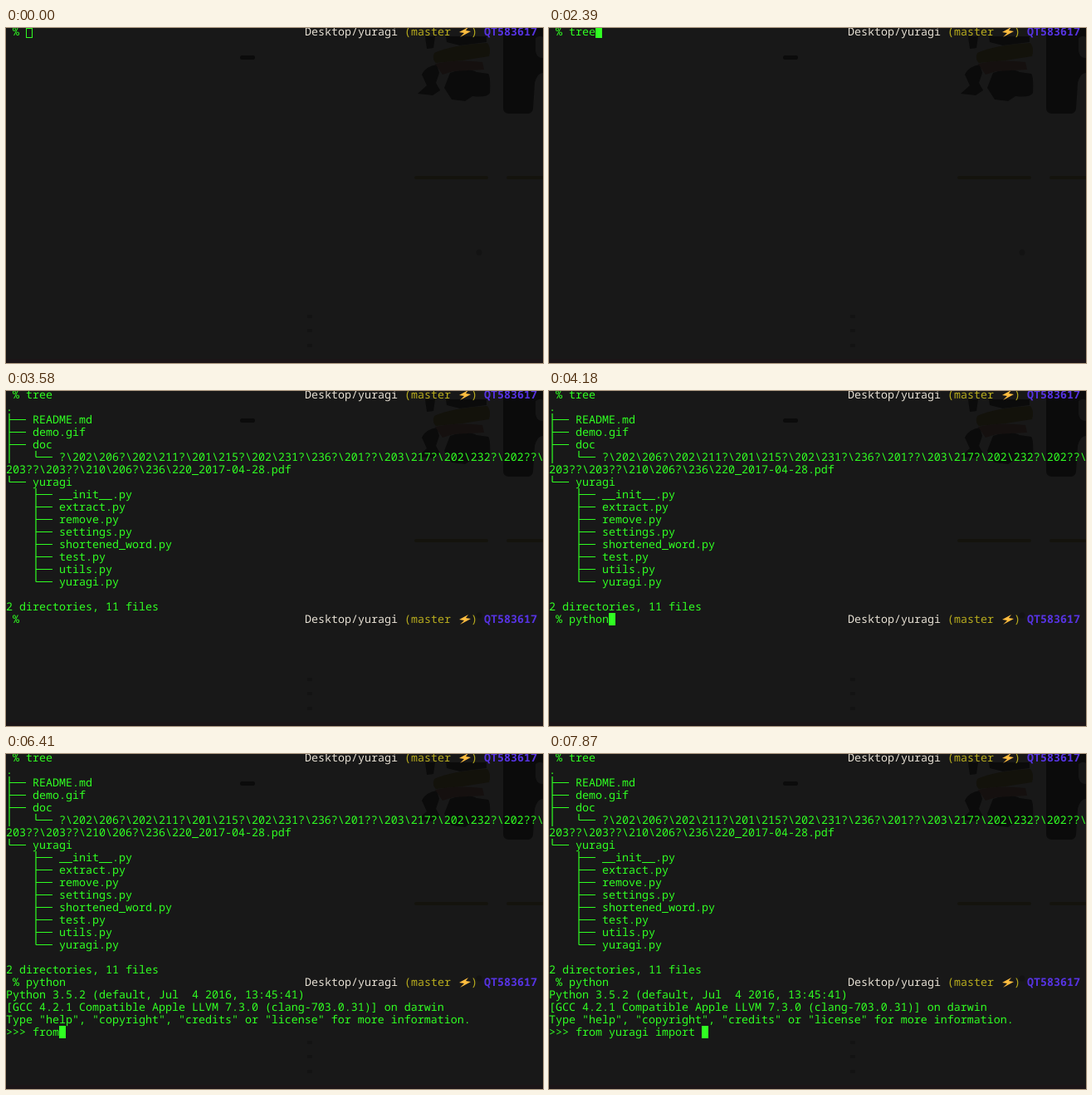
These frames come from a looping animation (647 by 403 pixels, 8000 ms). An HTML page:

```html
<!DOCTYPE html>
<html lang="en">
<head>
<meta charset="utf-8">
<title>Terminal session</title>
<style>
  html, body { margin: 0; width: 100%; height: 100%; overflow: hidden; background: #181818; }
  svg { display: block; width: 647px; height: 403px; }
  text {
    font: 13.3333px "Noto Sans Mono", "DejaVu Sans Mono", monospace;
    white-space: pre;
    text-rendering: geometricPrecision;
    font-variant-ligatures: none;
    fill: #30ff22;
  }
  .path { fill: #e6e0d4; }
  .branch { fill: #b9ad1e; }
  .host { fill: #5633e0; font-weight: bold; }
  .lines { fill: none; stroke: #30ff22; stroke-width: 1.2; }
</style>
</head>
<body>
<svg id="stage" viewBox="0 0 647 403">
  <rect width="647" height="403" fill="#181818"/>
  <g fill="#0b0b0b">
    <rect x="282" y="33" width="18" height="5" rx="2.5"/>
    <path d="M599 0H647V54Q640 54 637 66L635 97Q634 103 628 103H606Q599 103 599 96Z"/>
    <path d="M638 12Q643 8 647 11V36Q640 37 638 28Z" fill="#161616"/>
    <path d="M535 54Q556 47 567 53L581 55Q584 58 583 78Q580 84 562 82L553 88L537 86L528 72Z"/>
    <path d="M501 56Q506 46 519 44L522 54L518 66L523 75L514 81L496 79L507 69Z"/>
    <path d="M505 10H517L515 24L507 25ZM530 10H579V17L547 21L531 17Z"/>
  </g>
  <path d="M516 30Q538 20 580 18Q585 24 582 34L550 39L518 42Q513 38 516 30Z" fill="#13120b"/>
  <path d="M517 43Q545 37 574 41L576 50L539 52L526 56Z" fill="#15100f"/>
  <path d="M494 180H579M605 180H647" stroke="#14130d" stroke-width="4" stroke-linecap="round"/>
  <g fill="#131313">
    <circle cx="570" cy="270" r="3.5"/>
    <path d="M363 345h6v4h-6zM363 362h6v4h-6zM363 380h6v4h-6zM363 399h6v4h-6z"/>
  </g>
  <rect y="398" width="647" height="5" fill="#1b1517"/>
</svg>
<script>
const CELL = 8, ROW = 15, LOOP = 8000;
const stage = document.getElementById('stage');

function add(parent, tag, attrs, content = '') {
  const el = document.createElementNS('http://www.w3.org/2000/svg', tag);
  for (const key in attrs) el.setAttribute(key, attrs[key]);
  el.textContent = content;
  parent.append(el);
  return el;
}

const group = () => add(stage, 'g', {});
const write = (parent, row, col, content, cls = '') =>
  add(parent, 'text', { x: col * CELL, y: row * ROW + 9, class: cls }, content);

// Shell prompt with its right-hand side; returns the editable text.
function prompt(parent, row) {
  const y = row * ROW;
  write(parent, row, 1, '%');
  write(parent, row, 45, 'Desktop/yuragi', 'path');
  write(parent, row, 60, '(master', 'branch');
  write(parent, row, 70, ')', 'branch');
  write(parent, row, 72, 'QT583617', 'host');
  add(parent, 'path', {
    d: `M557 ${y - 1}L546 ${y + 5}L552 ${y + 6}L547 ${y + 11}L560 ${y + 4}L554 ${y + 3}Z`,
    fill: '#ffbd3f'
  });
  return write(parent, row, 3, '');
}

const shell = prompt(group(), 0);

const listing = group();
[
  [1, 0, '.'],
  [2, 4, 'README.md'],
  [3, 4, 'demo.gif'],
  [4, 4, 'doc'],
  [5, 8, '?\\202\\206?\\202\\211?\\201\\215?\\202\\231?\\236?\\201??\\203\\217?\\202\\232?\\202??\\'],
  [6, 0, '203??\\203??\\210\\206?\\236\\220_2017-04-28.pdf'],
  [7, 4, 'yuragi'],
  [17, 0, '2 directories, 11 files']
].forEach(line => write(listing, ...line));
['__init__', 'extract', 'remove', 'settings', 'shortened_word', 'test', 'utils', 'yuragi']
  .forEach((name, i) => write(listing, 8 + i, 8, name + '.py'));

const stem = (col, first, last) =>
  `M${col * CELL + 4} ${first * ROW - 3}V${last}`;
const twig = (col, row) => `M${col * CELL + 4} ${row * ROW + 4.5}h20`;
const twigs = [[0, 2], [0, 3], [0, 4], [4, 5], [0, 7]];
for (let row = 8; row < 16; row++) twigs.push([4, row]);
add(listing, 'path', {
  class: 'lines',
  d: stem(0, 2, 87) + stem(0, 7, 109.5) + stem(4, 5, 79.5) + stem(4, 8, 229.5) +
     twigs.map(t => twig(...t)).join('')
});

const second = group();
const launch = prompt(second, 18);

const banner = group();
[
  'Python 3.5.2 (default, Jul  4 2016, 13:45:41)',
  '[GCC 4.2.1 Compatible Apple LLVM 7.3.0 (clang-703.0.31)] on darwin',
  'Type "help", "copyright", "credits" or "license" for more information.',
  '>>>'
].forEach((line, i) => write(banner, 19 + i, 0, line));
const repl = write(banner, 22, 4, '');

const cursor = add(stage, 'rect', { stroke: '#30ff22' });

// Phases: shell input, tree output, second input, interpreter starting, interpreter input.
const inputs = [
  { phase: 0, el: shell, text: 'tree' },
  { phase: 2, el: launch, text: 'python' },
  { phase: 4, el: repl, text: 'from yuragi import ' }
];
const origins = [[0, 3], [18, 0], [18, 3], [19, 0], [22, 4]];

// [start ms, phase, typed characters, cursor style]
const steps = [
  [0, 0, 0, 'hollow'], [600, 0, 0], [1650, 0, 0, 'off'],
  [1800, 0, 1], [2090, 0, 3], [2390, 0, 4],
  [2690, 1, 0], [2840, 2, 0], [3580, 2, 0, 'off'],
  [3730, 2, 2], [4030, 2, 4], [4180, 2, 6],
  [4470, 3, 0], [4620, 4, 0], [5670, 4, 0, 'off'], [6120, 4, 1],
  [6410, 4, 4], [6560, 4, 5], [6700, 4, 7], [6850, 4, 9],
  [7000, 4, 11], [7150, 4, 12], [7290, 4, 14], [7440, 4, 16],
  [7580, 4, 17], [7730, 4, 18], [7870, 4, 19]
];

const show = (el, on) => el.setAttribute('visibility', on ? 'visible' : 'hidden');

function render([, phase, typed, style = 'solid']) {
  for (const input of inputs) {
    const count = phase > input.phase ? input.text.length : phase === input.phase ? typed : 0;
    input.el.textContent = input.text.slice(0, count);
  }
  show(listing, phase >= 1);
  show(second, phase >= 2);
  show(banner, phase >= 4);

  const [row, col] = origins[phase];
  const box = { x: (col + typed) * CELL + .5, y: row * ROW - 2.5, width: CELL - 1, height: ROW - 1 };
  if (row === 0) Object.assign(box, { y: .5, height: 11 });
  for (const key in box) cursor.setAttribute(key, box[key]);
  cursor.setAttribute('fill', style === 'solid' ? '#30ff22' : 'none');
  show(cursor, style !== 'off');
}

const start = performance.now();
let current;
function frame() {
  const time = (performance.now() - start) % LOOP;
  const step = steps.findLast(s => s[0] <= time);
  if (step !== current) render(current = step);
  requestAnimationFrame(frame);
}
frame();
</script>
</body>
</html>
```
